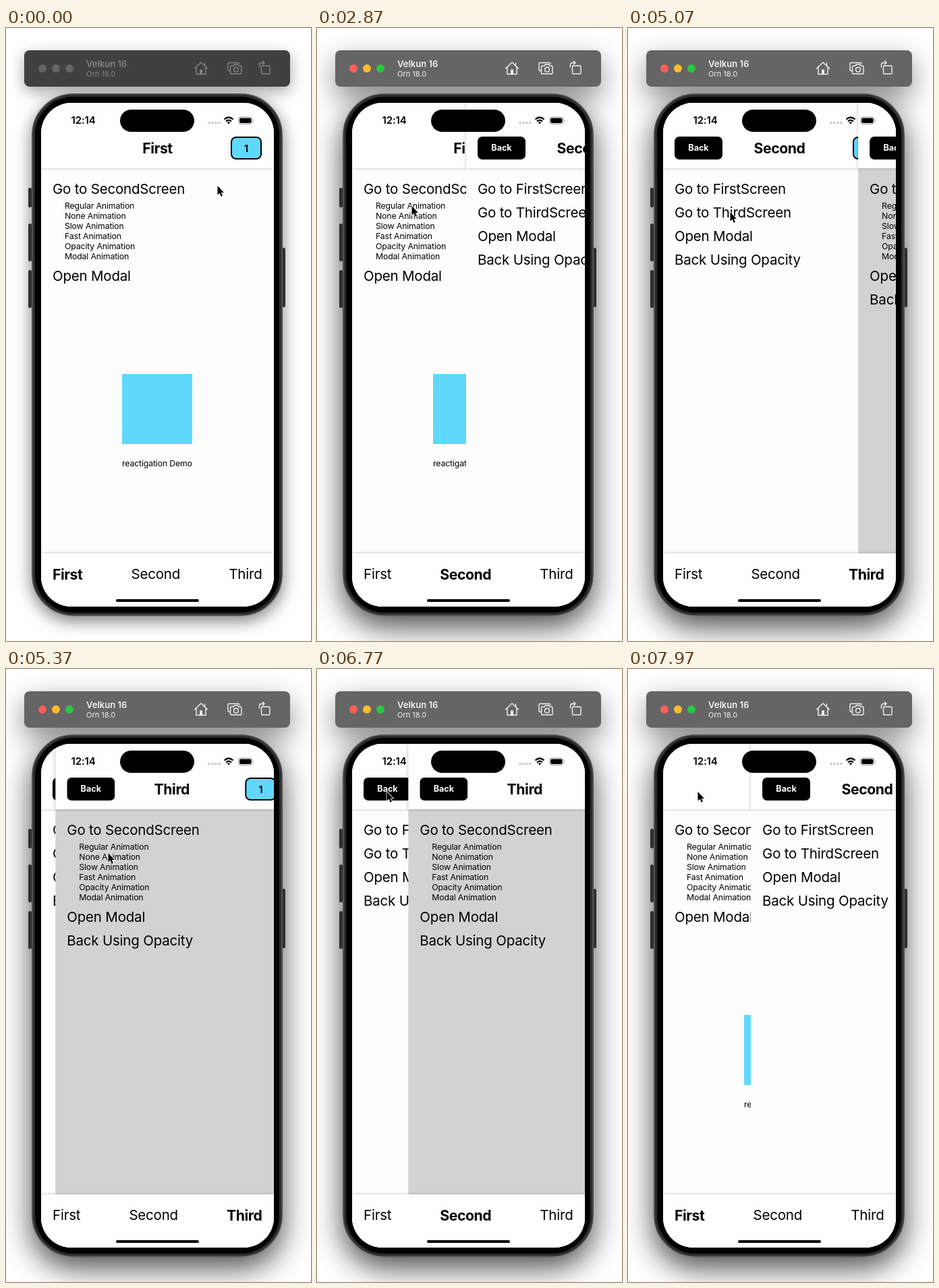
Write an HTML page that moves like this. It is 452x909 px and loops after 8000 ms.

```html
<!DOCTYPE html>
<html lang="en">
<head>
<meta charset="utf-8">
<title>Navigation demo</title>
<style>
  html, body { margin: 0; width: 100%; height: 100%; overflow: hidden; background: #fff; }
  body { position: relative; font: 400 20.5px/30px Inter, "Liberation Sans", sans-serif; letter-spacing: -.01em; color: #000; }
  div, span, svg { box-sizing: border-box; white-space: nowrap; }
  .abs, .screen, .screen > *, .shade, .bar > *, .side { position: absolute; }

  .bar { position: absolute; left: 27px; top: 33px; width: 394px; height: 54px; border-radius: 8px; background: #404040; color: #848484; letter-spacing: 0; }
  .light { top: 21px; width: 12px; height: 12px; border-radius: 50%; background: #656565; }
  .device { left: 92px; top: 12px; font: 600 13px/17px Inter, sans-serif; }
  .system { left: 92px; top: 28px; font: 400 11px/15px Inter, sans-serif; }
  .bar svg { left: 0; top: 0; fill: none; stroke: currentColor; stroke-width: 1.4; stroke-linejoin: round; stroke-linecap: round; }

  .shade, .phone { position: absolute; left: 38px; top: 97px; width: 372px; height: 775px; border-radius: 62px; }
  .phone { background: #000; border: 2px solid #525252; box-shadow: inset 0 0 0 3px #2d2d2d; }
  .side { width: 5px; background: #303030; border-radius: 2px; }
  .view { position: absolute; left: 52px; top: 111px; width: 344.5px; height: 747px; border-radius: 45px; overflow: hidden; background: #fdfdfd; }

  .screen { left: 0; top: 0; width: 345px; height: 747px; }
  .body { top: 97px; width: 345px; height: 650px; background: #fdfdfd; }
  .third .body { background: #d2d2d1; }
  .head { width: 345px; height: 97px; background: #fefefe; box-shadow: 0 0 4px rgba(0,0,0,.28); }
  .title { top: 52px; width: 345px; text-align: center; font-weight: 700; font-size: 21.2px; letter-spacing: -.02em; }
  .row { left: 17px; }
  .row.small { left: 35px; }
  .small { font-size: 12.3px; letter-spacing: -.012em; }
  .back { left: 17px; top: 49.5px; width: 71px; height: 34px; border-radius: 7px; background: #000; color: #fff; text-align: center; font: 700 12.6px/33px Inter, sans-serif; letter-spacing: 0; }
  .count { left: 281px; top: 49.5px; width: 46px; height: 34.5px; border: 2px solid #000; border-radius: 8px; background: #5fd8fc; text-align: center; font: 700 14px/31px Inter, sans-serif; }
  .logo { left: 120px; top: 402px; width: 104px; height: 104px; background: #5fd8fc; }
  .caption { top: 519.5px; width: 344px; text-align: center; }

  .tabs { left: 0; top: 668px; width: 345px; height: 79px; padding: 16px 17.5px 0 17px; display: flex; justify-content: space-between; background: #fefefe; box-shadow: 0 0 4px rgba(0,0,0,.28); }
  .clock { left: 44.5px; top: 11px; font-weight: 600; font-size: 15px; letter-spacing: -.01em; }
  .island { left: 117px; top: 10px; width: 110px; height: 33px; border-radius: 17px; background: #000; }
  .home { left: 111px; top: 736px; width: 123px; height: 4px; border-radius: 2px; background: #000; }
</style>
</head>
<body>
  <div class="shade" id="shade"></div>
  <div class="bar" id="bar">
    <i class="light" style="left:21px"></i>
    <i class="light" style="left:41px"></i>
    <i class="light" style="left:61px"></i>
    <span class="device">Velkun 16</span>
    <span class="system">Orn 18.0</span>
    <svg width="394" height="54">
      <path d="M252.500 27L262 18L271.500 27M255 25V35.500H269V25M267.500 22.500V19"/>
      <rect x="260" y="28.500" width="4" height="7" fill="currentColor" stroke="none"/>
      <path d="M305 30.500H303.500Q302 30.500 302 29V20Q302 18.500 303.500 18.500H317.500Q319 18.500 319 20"/>
      <path d="M307 23H310L311.500 21H316.500L318 23H320.500Q322 23 322 24.500V33.500Q322 35 320.500 35H307Q305.500 35 305.500 33.500V24.500Q305.500 23 307 23Z"/>
      <circle cx="314" cy="28.700" r="3.400"/>
      <rect x="351.500" y="23" width="12.500" height="12" rx="1.500"/>
      <path d="M348.500 25V22Q348.500 18.500 352 18.500H356M353.500 16L356 18.500L353.500 21"/>
    </svg>
  </div>

  <i class="side" style="left:33px;top:237px;height:29px"></i>
  <i class="side" style="left:33px;top:290px;height:56px"></i>
  <i class="side" style="left:33px;top:359px;height:56px"></i>
  <i class="side" style="left:409px;top:326px;height:88px"></i>
  <div class="phone"></div>

  <div class="view" id="view">
    <div class="abs tabs" id="tabs"><span>First</span><span>Second</span><span>Third</span></div>
    <span class="abs clock">12:14</span>
    <div class="abs island"></div>
    <svg class="abs" style="left:0;top:0" width="345" height="50">
      <g fill="#c4c4c4">
        <circle cx="249" cy="29.500" r="1.700"/><circle cx="254" cy="29.500" r="1.700"/>
        <circle cx="259" cy="29.500" r="1.700"/><circle cx="264" cy="29.500" r="1.700"/>
      </g>
      <g fill="none" stroke="#000" stroke-width="2.200">
        <path d="M271.500 24.500Q278 18.500 284.500 24.500M274 27.500Q278 23.800 282 27.500"/>
      </g>
      <path d="M275.800 29.200Q278 27.300 280.200 29.200L278 31.500Z"/>
      <rect x="292.500" y="21" width="20.500" height="10.500" rx="3.300" fill="none" stroke="#999"/>
      <rect x="294" y="22.500" width="17.500" height="7.500" rx="2"/>
      <path d="M314.300 24.300Q316 26.200 314.300 28.200Z" fill="#999"/>
    </svg>
    <div class="abs home"></div>
  </div>

  <svg class="abs" id="cursor" style="left:0;top:0;overflow:visible" width="12" height="18">
    <path d="M.5 0V13.500L3.600 10.700L5.700 15.700L7.900 14.800L5.800 9.900H9.900Z" stroke="#fff" stroke-width="1.600" stroke-linejoin="round" paint-order="stroke"/>
  </svg>

<script>
const LOOP = 8000;
const WIDTH = 345;
const $ = sel => document.querySelector(sel);

const MODES = ['Regular', 'None', 'Slow', 'Fast', 'Opacity', 'Modal'];
const modeRows = MODES.map((m, i) => [m + ' Animation', 263.5 + i * 15, 'small']);

// Rows are [label, centre y on the stage, extra class].
function addScreen(name, title, rows, extra = '') {
  const list = rows.map(([label, y, cls = '']) =>
    `<span class="row ${cls}" style="top:${y - 126}px">${label}</span>`).join('');
  const back = name === 'first' ? '' : '<div class="back">Back</div>';
  $('#tabs').insertAdjacentHTML('beforebegin',
    `<div class="screen ${name}"><div class="body"></div><div class="head"></div>
     <div class="title">${title}</div>${back}<div class="count">1</div>${list}${extra}</div>`);
}

addScreen('first', 'First',
  [['Go to SecondScreen', 239], ...modeRows, ['Open Modal', 368]],
  '<div class="logo"></div><div class="caption small">reactigation Demo</div>');
addScreen('second', 'Second',
  [['Go to FirstScreen', 239], ['Go to ThirdScreen', 274], ['Open Modal', 309], ['Back Using Opacity', 344]]);
addScreen('third', 'Third',
  [['Go to SecondScreen', 239], ...modeRows, ['Open Modal', 368], ['Back Using Opacity', 403]]);

// Steps are [ms, value, easing towards the next step].
function play(el, prop, steps) {
  const frames = steps.map(([ms, value, easing = 'step-end']) =>
    ({ offset: ms / LOOP, [prop]: value, easing }));
  if (steps.at(-1)[0] < LOOP) frames.push({ offset: 1, [prop]: steps.at(-1)[1] });
  el.animate(frames, { duration: LOOP, iterations: Infinity });
}

const shift = (x, y = 0) => `translate(${x}px, ${y}px)`;
const parked = shift(WIDTH + 15);
const slideIn = ms => [
  [ms, shift(WIDTH), 'ease-in'], [ms + 250, shift(WIDTH / 2), 'ease-out'], [ms + 500, shift(0)]];
const slideOut = ms => [
  [ms, shift(0), 'ease-in'], [ms + 250, shift(WIDTH / 2), 'ease-out'], [ms + 500, parked]];

play($('.second'), 'transform', [
  [0, parked], ...slideIn(2618), [7760, shift(0), 'ease-in'], [LOOP, shift(161)]]);
play($('.third'), 'transform', [[0, parked], ...slideIn(4944), ...slideOut(6610)]);

const press = (el, down, up) => play(el, 'opacity', [[0, 1], [down, .5], [up, 1]]);
press($('.first .small'), 2400, 2540);
press(document.querySelectorAll('.second .row')[1], 4730, 4900);
press($('.third .back'), 6400, 6570);
press($('.second .back'), 7530, 7670);

// The active tab is bold.
const active = [[0, 0], [2540, 1], [4900, 2], [6570, 1], [7670, 0]];
[...$('#tabs').children].forEach((tab, i) => {
  const pick = (on, off) => active.map(([ms, n]) => [ms, n === i ? on : off]);
  play(tab, 'fontWeight', pick(700, 400));
  play(tab, 'fontSize', pick('21.2px', '20.5px'));
  play(tab, 'letterSpacing', pick('-.02em', '-.01em'));
});

// The window gains focus on the first click.
const focus = (el, prop, off, on) => play(el, prop, [[0, off], [2400, on]]);
focus($('#bar'), 'backgroundColor', '#404040', '#656565');
focus($('#bar'), 'color', '#848484', '#f2f2f2');
focus($('#bar'), 'boxShadow', '0 7px 22px rgba(0,0,0,.36)', '0 15px 40px rgba(0,0,0,.46)');
focus($('#shade'), 'boxShadow', '0 7px 24px rgba(0,0,0,.52)', '0 16px 44px rgba(0,0,0,.7)');
const LIGHTS = ['#ff5f57', '#febc2e', '#28c840'];
document.querySelectorAll('.light').forEach((el, i) =>
  focus(el, 'backgroundColor', '#656565', LIGHTS[i]));

play($('#cursor'), 'transform', [
  [0, shift(313, 234)],
  [300, shift(313, 234), 'ease-in-out'],
  [1100, shift(114, 265), 'ease-in-out'],
  [1470, shift(133, 264), 'ease-in-out'],
  [1900, shift(128, 264)],
  [1970, shift(128, 264), 'ease-in-out'],
  [2130, shift(140, 264)],
  [3600, shift(140, 264), 'ease-in-out'],
  [4000, shift(151, 273)],
  [5830, shift(151, 273), 'ease-in-out'],
  [6400, shift(103, 182)]]);
</script>
</body>
</html>
```
